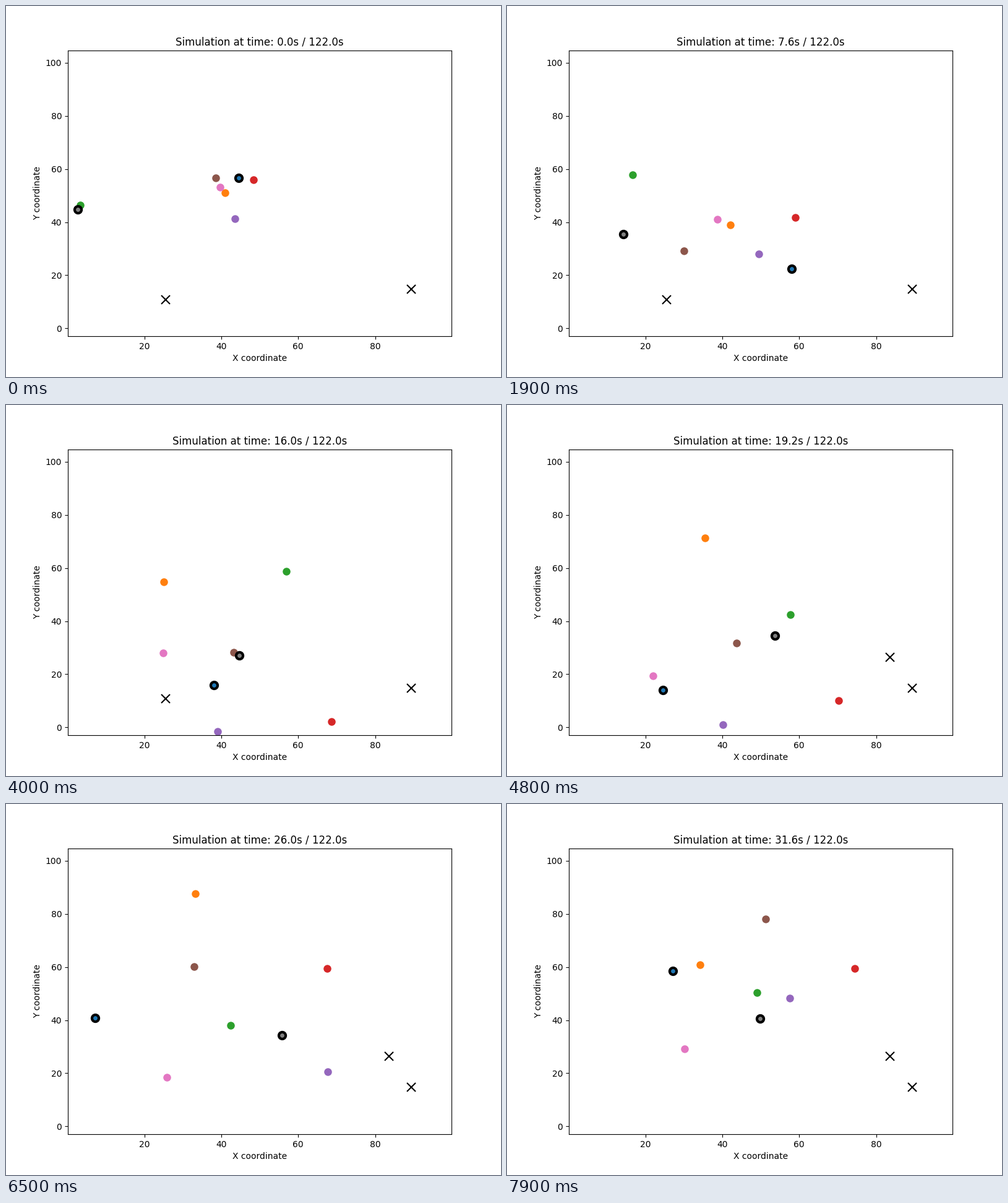
These frames come from a looping animation (800x600 px, 8000 ms). A matplotlib script:

```python
import numpy as np
import matplotlib.pyplot as plt
from matplotlib.animation import FuncAnimation
from matplotlib.transforms import Affine2D

W, H = 800, 600
FRAMES, INTERVAL = 80, 100
STEP, TOTAL = 0.4, 122.0
PICKUP = 45  # step at which the first target is reached

# Waypoints in stage pixels (y down), shared times plus a few turning points
TIMES = [0, 10, 28, 40, 48, 65, 79]
PATHS = {
    "tab:blue": [(376, 277.5), (462, 347), (396, 444), (335.5, 453), (252, 461), (144, 345.5), (268, 270)],
    "tab:orange": [(353.5, 301.5), (375, 331), (311, 352.5), (255, 286), (319.5, 215), (306, 145), (312, 259.5)],
    "tab:green": [(119.5, 321.5), (144, 309), (305, 241), (452.5, 269), (458, 339), (363, 357.5), (404, 305)],
    "tab:red": [(400, 281), (438, 303), (493.5, 412), (525.5, 511.5), (535.5, 477.5), (518.5, 265.5), (562, 266)],
    "tab:purple": [(369.5, 343.5), (384, 333), (401, 486.5), (342, 527.5), (348.5, 516.5), (519.5, 432.5), (457, 313.5)],
    "tab:brown": [(338.5, 277.5), (306, 345.5), (251, 426), (368, 400), (370.5, 384.5), (303.5, 262.5), (417.5, 186)],
    "tab:pink": [(346, 292.5), (374.5, 324.5), (287, 362.5), (254, 401), (236, 438), (259.5, 442), (287, 395.5)],
    "tab:gray": [(115.5, 329), (135.5, 349), (274, 391), (377, 404.5), (433, 373), (446, 374), (409, 347)],
}
TURNS = {
    "tab:blue": [(18, 465, 419), (54, 162, 444), (60, 136.5, 394), (72, 210, 303)],
    "tab:red": [(55, 554, 388)],
    "tab:purple": [(36, 355, 521.5), (54, 397, 489.5)],
    "tab:brown": [(31, 240, 428)],
    "tab:gray": [(2, 110.5, 333), (18, 180, 367)],
}
RINGED = ("tab:blue", "tab:gray")
TARGETS = [(257.5, 474.5), (654.5, 457.5)]
NEXT_TARGET = (618.5, 407.5)


def spline(t, p, at):
    """Natural cubic spline through points p at times t."""
    h = np.diff(t)
    slope = np.diff(p, axis=0) / h[:, None]
    n = len(t)
    A, rhs = np.eye(n), np.zeros_like(p)
    for i in range(1, n - 1):
        A[i, i - 1:i + 2] = h[i - 1], 2 * (h[i - 1] + h[i]), h[i]
        rhs[i] = 6 * (slope[i] - slope[i - 1])
    m = np.linalg.solve(A, rhs)
    k = np.clip(np.searchsorted(t, at, side="right") - 1, 0, n - 2)
    d, hk = (at - t[k])[:, None], h[k][:, None]
    b = slope[k] - hk * (2 * m[k] + m[k + 1]) / 6
    return p[k] + d * (b + d * (m[k] / 2 + d * (m[k + 1] - m[k]) / (6 * hk)))


def track(color):
    pts = [(t, *xy) for t, xy in zip(TIMES, PATHS[color])]
    pts = np.array(sorted(pts + TURNS.get(color, [])), float)
    return spline(pts[:, 0], pts[:, 1:], np.arange(FRAMES, dtype=float))


fig, ax = plt.subplots(figsize=(W / 100, H / 100), dpi=100)
ax.set_xlim(0.07, 99.87)
ax.set_ylim(-2.95, 104.62)
ax.set_xlabel("X coordinate")
ax.set_ylabel("Y coordinate")
title = ax.set_title("")

stage = Affine2D().scale(1, -1).translate(0, H)
crosses, = ax.plot([], [], "kx", ms=10, mew=1.5, transform=stage)
tracks, dots = [], []
for color in PATHS:
    ringed = color in RINGED
    dot, = ax.plot([], [], "o", ms=8, color=color, transform=stage,
                   mec="black" if ringed else color, mew=3 if ringed else 1)
    dots.append(dot)
    tracks.append(track(color))


def update(i):
    for dot, path in zip(dots, tracks):
        dot.set_data(path[i:i + 1, 0], path[i:i + 1, 1])
    first = TARGETS[0] if i < PICKUP else NEXT_TARGET
    crosses.set_data(*zip(first, TARGETS[1]))
    title.set_text(f"Simulation at time: {i * STEP:.1f}s / {TOTAL:.1f}s")
    return [*dots, crosses, title]


anim = FuncAnimation(fig, update, frames=FRAMES, interval=INTERVAL,
                     repeat=True, repeat_delay=0, blit=False)
plt.show()
```
